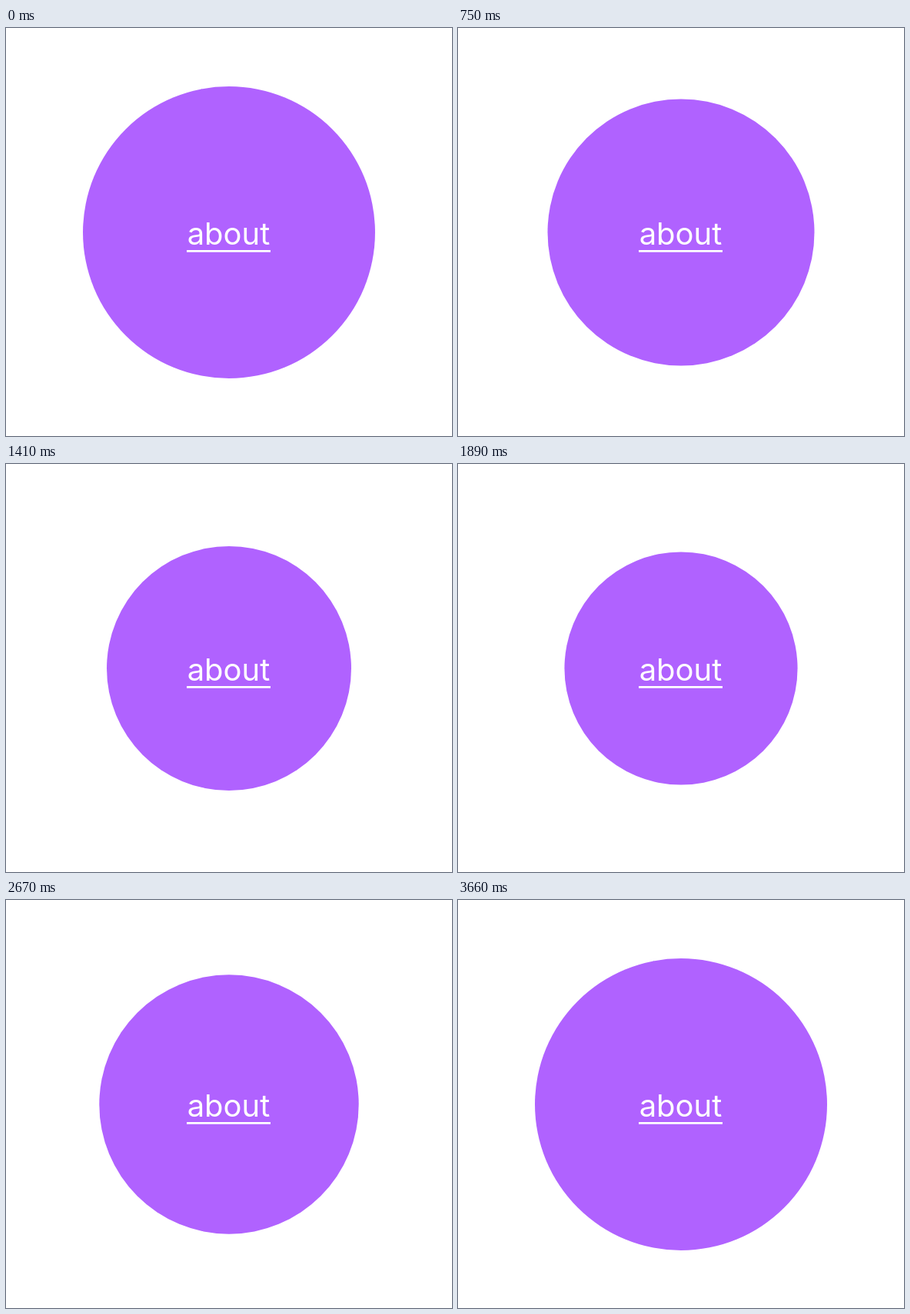
An HTML page for the animation above (3.69 s loop, 580 px wide and 531 px high).

```html
<!DOCTYPE html>
<html lang="en">
<head>
<meta charset="utf-8">
<title>about</title>
<style>
  html, body { margin: 0; width: 100%; height: 100%; overflow: hidden; background: #fff; }
  svg { display: block; }
  text { font: 400 40px Inter, sans-serif; }
</style>
</head>
<body>
<svg width="580" height="531" viewBox="0 0 580 531">
  <circle id="disc" cx="290" cy="266" r="190" fill="#b062ff"/>
  <g fill="#fff">
    <text x="289.5" y="281.5" text-anchor="middle">about</text>
    <rect x="235" y="289" width="109" height="2.7"/>
  </g>
</svg>
<script>
  const LOOP = 3690, HALF = 1820, BIG = 190, SMALL = 150;
  const disc = document.getElementById('disc');

  // Shrinks and grows linearly, then rests at full size until the loop ends.
  function radius(t) {
    const size = Math.min(1, Math.abs(t - HALF) / HALF);
    return SMALL + (BIG - SMALL) * size;
  }

  function draw() {
    disc.setAttribute('r', radius(performance.now() % LOOP));
    requestAnimationFrame(draw);
  }
  draw();
</script>
</body>
</html>
```
